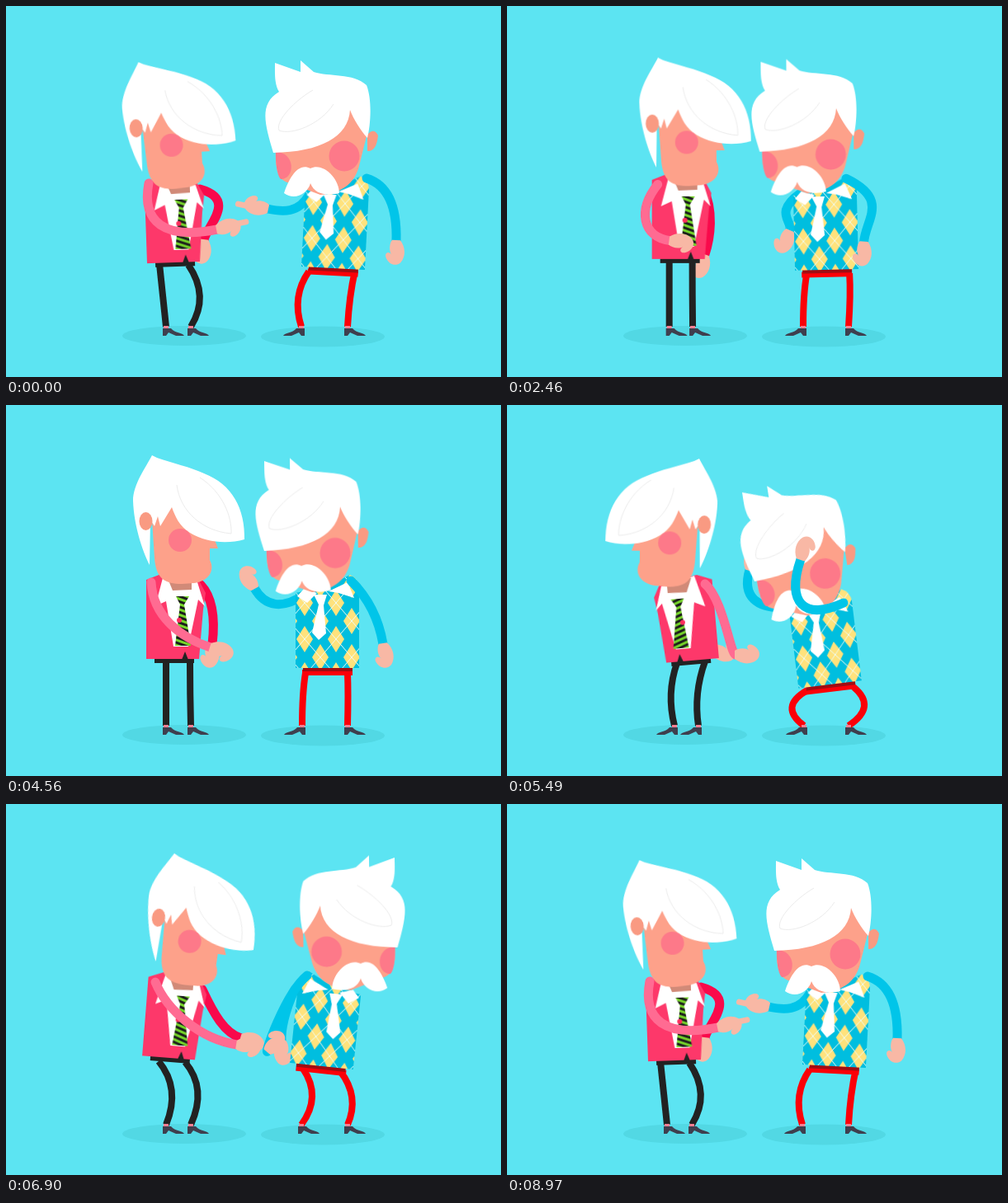
These frames come from a looping animation (600x450 px, 9.33 s). An HTML page without scripts:

```html
<!DOCTYPE html>
<html lang="en">
<head>
<meta charset="utf-8">
<title>Two gentlemen</title>
<style>
html, body { margin: 0; width: 100%; height: 100%; overflow: hidden; background: #5ce4f2; }
svg { display: block; width: 100%; height: 100%; }
marker { overflow: visible; }

.arm, .leg { fill: none; stroke-width: 11; stroke-linecap: round; }
.leg { stroke-width: 8; stroke-linecap: butt; }
.near { stroke: #ff6b92; }
.far { stroke: #f9094b; }
.black { stroke: #222; }
.blue { stroke: #00c5e9; }
.red { stroke: #fb0008; }
.hand { fill: #f8b8a5; }
.finger { stroke: #f8b8a5; stroke-width: 7; stroke-linecap: round; }
.skin { fill: #fda18a; }
.ear { fill: #f99a82; }
.cheek { fill: #fd7989; }
.hair { fill: #fff; }
.strand { fill: none; stroke: #ececec; }

/* One timeline for every part; each part only names its six poses:
   a quarrel, b walk, c talk, d wave, e sulk, f make up */
.part, .limb, .step { animation: 9.33s cubic-bezier(.55, 0, .45, 1) infinite; }
.part { animation-name: pose; }
.limb { animation-name: bend; }
@keyframes pose {
  0%, .64%, 96.14%, 100% { transform: var(--a); }
  16.72% { transform: var(--b); }
  36.66% { transform: var(--c); }
  48.87% { transform: var(--d); }
  58.84% { transform: var(--e); }
  73.95% { transform: var(--f); }
}
@keyframes bend {
  0%, .64%, 96.14%, 100% { d: var(--a); }
  16.72% { d: var(--b); }
  36.66% { d: var(--c); }
  48.87% { d: var(--d); }
  58.84% { d: var(--e); }
  73.95% { d: var(--f); }
}

/* Hands and shoes are line ends, so they follow their limb */
.arm { marker-end: url(#fist); }
.leg { marker-end: url(#shoe); }
.back { marker-end: url(#shoeBack); }
.points { animation: bend 9.33s cubic-bezier(.55, 0, .45, 1) infinite, point 9.33s step-end infinite; }
.toe { animation: bend 9.33s cubic-bezier(.55, 0, .45, 1) infinite, toe 9.33s step-end infinite; }
@keyframes point {
  0%, 94%, 100% { marker-end: url(#point); }
  3% { marker-end: url(#fist); }
}
@keyframes toe {
  0%, 86%, 100% { marker-end: url(#shoe); }
  67% { marker-end: url(#shoeBack); }
}

.walk { animation: walk 9.33s linear infinite; }
@keyframes walk {
  0%, 3%, 21.5%, 100% { transform: translate(0, 0); }
  9.6%, 12% { transform: translate(-165px, 0); }
  16.72% { transform: translate(-107px, 0); }
}
.step { animation-name: stride; }
@keyframes stride {
  0%, .64%, 22%, 100% { rotate: 0deg; }
  4%, 10.6%, 16.72% { rotate: calc(var(--side) * 12.5deg); }
  7.3%, 13.7% { rotate: calc(var(--side) * -12.5deg); }
}
.turnL { transform-origin: 213.5px 0; animation: turnL 9.33s step-end infinite; }
.turnR { transform-origin: 387px 0; animation: turnR 9.33s step-end infinite; }
@keyframes turnL {
  0%, 12%, 66%, 100% { transform: scale(1, 1); }
  3%, 54% { transform: scale(-1, 1); }
}
@keyframes turnR {
  0%, 86%, 100% { transform: scale(1, 1); }
  67% { transform: scale(-1, 1); }
}

/* left man */
#headL {
  --a: translate(161.5px, 68px) rotate(-3.4deg);
  --b: translate(184px, 58px) rotate(-.8deg);
  --c: translate(184px, 68px) rotate(0deg);
  --d: translate(178px, 61px) rotate(0deg);
  --e: translate(195px, 65px) rotate(-1deg);
  --f: translate(205px, 60px) rotate(8.4deg);
}
#bodyL {
  --a: translate(205px, 311px) rotate(-2deg);
  --b: translate(212px, 305px) rotate(0deg);
  --c: translate(207px, 309px) rotate(0deg);
  --d: translate(204px, 308px) rotate(0deg);
  --e: translate(204px, 310px) rotate(5deg);
  --f: translate(199px, 308px) rotate(4.5deg);
}
#nearArm {
  --a: path("M173 215C164 262 192 284 256 271");
  --b: path("M185 215C165 245 180 288 204 300");
  --c: path("M180 218C150 250 145 271 190 267");
  --d: path("M176 215C178 255 210 282 248 294");
  --e: path("M187 217C165 235 156 303 150 303");
  --f: path("M181 216C195 250 235 285 280 292");
}
#farArm {
  --a: path("M235 222C282 235 242 268 240 284");
  --b: path("M238 222C250 250 240 285 228 300");
  --c: path("M238 222C252 245 255 275 253 305");
  --d: path("M236 218C252 235 253 265 250 290");
  --e: path("M205 220C190 250 190 292 178 296");
  --f: path("M238 225C252 255 265 278 285 284");
}
#legL1 {
  --a: path("M186 313Q190 350 194 389");
  --b: path("M199 308Q199 350 199 389");
  --c: path("M194 312Q194 350 194 389");
  --d: var(--c);
  --e: path("M187 311Q201 350 195 389");
  --f: path("M185 312Q212 345 194 389");
}
#legL2 {
  --a: path("M221 314Q247 352 224 389");
  --b: path("M226 308Q226 350 226 389");
  --c: path("M223 312Q223 350 224 389");
  --d: var(--c);
  --e: path("M221 313Q234 350 224 389");
  --f: path("M217 313Q244 345 224 389");
}

/* right man */
#headR {
  --a: translate(326px, 69px) rotate(0deg);
  --b: translate(307px, 64px) rotate(0deg);
  --c: translate(308px, 72px) rotate(-1deg);
  --d: translate(313px, 68px) rotate(-1deg);
  --e: translate(285px, 106px) rotate(-9deg);
  --f: translate(303px, 65px) rotate(.8deg);
}
#bodyR {
  --a: translate(396px, 317px) rotate(3deg);
  --b: translate(388px, 318px) rotate(-2.5deg);
  --c: translate(386px, 320px) rotate(0deg);
  --d: translate(389px, 318px) rotate(0deg);
  --e: translate(391px, 338px) rotate(-7deg);
  --f: translate(391px, 317px) rotate(-6deg);
}
#armR1 {
  --a: path("M437 209C466 218 474 250 473 285");
  --b: path("M410 207C490 235 428 250 426 276");
  --c: path("M412 212C435 235 442 268 440 299");
  --d: path("M418 213C440 235 452 260 457 290");
  --e: path("M408 240C360 262 338 240 356 187");
  --f: path("M409 208C436 230 462 306 457 300");
}
#armR2 {
  --a: path("M368 228C355 252 335 250 317 246");
  --b: path("M354 220C290 240 346 255 350 278");
  --c: path("M358 235C358 265 350 268 334 267");
  --d: path("M362 230C335 248 314 245 301 222");
  --e: path("M345 245C300 250 285 230 294 200");
  --f: path("M424 225C436 250 441 275 440 288");
}
#legR1 {
  --a: path("M367 322Q346 352 358 389");
  --b: path("M366 324Q359 350 359 389");
  --c: path("M360 327Q359 350 359 389");
  --d: path("M363 325Q359 350 359 389");
  --e: path("M364 346Q329 366 360 389");
  --f: path("M369 324Q345 355 360 389");
}
#legR2 {
  --a: path("M423 321Q416 352 414 389");
  --b: path("M417 322Q420 350 414 389");
  --c: path("M413 327Q413 350 414 389");
  --d: path("M414 325Q415 350 414 389");
  --e: path("M420 342Q449 366 414 389");
  --f: path("M414 321Q391 355 416 389");
}
</style>
</head>
<body>
<svg viewBox="0 0 600 450">
  <defs>
    <pattern id="argyle" width="38" height="44" patternUnits="userSpaceOnUse" x="-27" y="-78">
      <path fill="#00bedf" d="M0 0H38V44H0Z"/>
      <path id="gem" fill="#ffe27c" d="M19 6L29 22 19 38 9 22Z"/>
      <use href="#gem" x="-19" y="-22"/>
      <use href="#gem" x="19" y="-22"/>
      <use href="#gem" x="-19" y="22"/>
      <use href="#gem" x="19" y="22"/>
      <path stroke="#eefcf2" d="M0 0L38 44M38 0L0 44"/>
    </pattern>
    <pattern id="stripes" width="20" height="6" patternUnits="userSpaceOnUse" patternTransform="rotate(20)">
      <path fill="#1c1c1c" d="M0 0H20V6H0Z"/>
      <path fill="#76d62a" d="M0 0H20V3H0Z"/>
    </pattern>
    <path id="palm" class="hand" d="M-1-5C8-12 19-12 26-6C32 0 28 9 20 12C14 14 12 8 17 5C12 9 3 8-1 5Z"/>
    <g id="boot">
      <path fill="#fa7f92" d="M-3-1H3V2H-3Z"/>
      <path fill="#3f3f4e" d="M-4 2V11H0L3 7 12 11H22C20 7 11 8 6 2Z"/>
    </g>
    <marker id="fist" markerUnits="userSpaceOnUse" orient="auto"><use href="#palm"/></marker>
    <marker id="point" markerUnits="userSpaceOnUse" orient="auto">
      <path class="finger" d="M17-2H36"/><use href="#palm"/>
    </marker>
    <marker id="shoe" markerUnits="userSpaceOnUse" orient="0"><use href="#boot"/></marker>
    <marker id="shoeBack" markerUnits="userSpaceOnUse" orient="0"><use href="#boot" transform="scale(-1 1)"/></marker>
  </defs>

  <rect width="600" height="450" fill="#5ce4f2"/>
  <ellipse cx="384" cy="401" rx="75" ry="12.5" fill="#52d8e4"/>

  <g class="walk">
    <ellipse cx="216" cy="400" rx="75" ry="12" fill="#52d8e4"/>
    <g class="turnL">
      <path id="farArm" class="limb arm far"/>
      <g class="step" style="--side:1;transform-origin:199px 308px"><path id="legL1" class="limb leg black"/></g>
      <g class="step" style="--side:-1;transform-origin:226px 308px"><path id="legL2" class="limb leg black"/></g>

      <g id="bodyL" class="part">
        <path fill="#222" d="M-24-1H24V5H-24Z"/>
        <path fill="#fd386a" d="M-16-103L-34-96V0H30L35-60 38-80 30-95Z"/>
        <path fill="#222" d="M13-9L9 1H17Z"/>
        <path fill="#fff" d="M-13-102L-23-64-10-70-1-15H17L29-72 37-64 28-93Z"/>
        <path fill="#d18a78" d="M-9-100H21V-84L-2-83Z"/>
        <path fill="url(#stripes)" d="M2-76H18L12-66 20-16H1L7-66Z"/>
        <circle cx="6" cy="-47" r="3" fill="#fd2d5d"/>
      </g>

      <g id="headL" class="part">
        <path class="skin" d="M-1 78L2 125C4 150 15 156 35 156L50 155C67 153 76 140 69 127V113H79L72 95 21 55Z"/>
        <path class="hair" d="M-1 0L5 3C25 10 45 14 62 22C96 35 112 65 111 102C90 108 65 106 45 94C32 86 27 74 23 63L9 86 6 74 2 86-3 78-4 133C-13 115-23 85-24 55C-24 35-8 14-1 0Z"/>
        <path class="strand" d="M29 36C33 68 60 92 95 95C96 75 85 45 57 27"/>
        <ellipse class="ear" cx="-8.5" cy="80" rx="8" ry="11"/>
        <circle class="cheek" cx="33" cy="103" r="14"/>
      </g>

      <path id="nearArm" class="limb arm near points"/>
    </g>
  </g>

  <g class="turnR">
    <path id="armR2" class="limb arm blue points"/>
    <path id="legR1" class="limb leg red back"/>
    <path id="legR2" class="limb leg red toe"/>

    <g id="bodyR" class="part">
      <path fill="#fb0008" d="M-30 3H31V10H-30Z"/>
      <path fill="#a00d13" d="M-29-1H31V5H-29Z"/>
      <path fill="url(#argyle)" d="M-38 1V-90L0-98 28-112Q38-108 39-96V1Z"/>
      <path fill="#fff" d="M-36-86L-28-95-12-90-24-78ZM2-92L25-103 33-84 14-90ZM-16-88H0L-4-75-1-41-10-33-18-42-10-76Z"/>
    </g>

    <g id="headR" class="part">
      <path class="ear" d="M112 87Q120 78 125 88Q123 108 112 107Z"/>
      <path class="skin" d="M1 100C0 125 2 140 15 145L55 160C85 158 98 142 102 125L112 85 91 50Z"/>
      <path class="cheek" d="M1 108C25 108 25 141 7 141C2 136 1 120 1 108Z"/>
      <circle class="cheek" cx="84" cy="113" r="18.5"/>
      <path class="hair" d="M0 0L31 11V-3L47 11C65 17 95 12 111 27C118 45 116 75 112 91C104 82 95 68 91 57C89 90 55 108-2 109C-12 75-20 50 5 35C-1 25 0 12 0 0Z"/>
      <path class="strand" d="M46 33C25 45 0 70 5 82C20 88 55 75 71 50"/>
      <path class="hair" d="M43 128C28 120 17 140 11 158C24 168 40 158 43 146C48 159 62 162 78 158C78 140 58 120 43 128Z"/>
    </g>

    <path id="armR1" class="limb arm blue"/>
  </g>
</svg>
</body>
</html>
```
